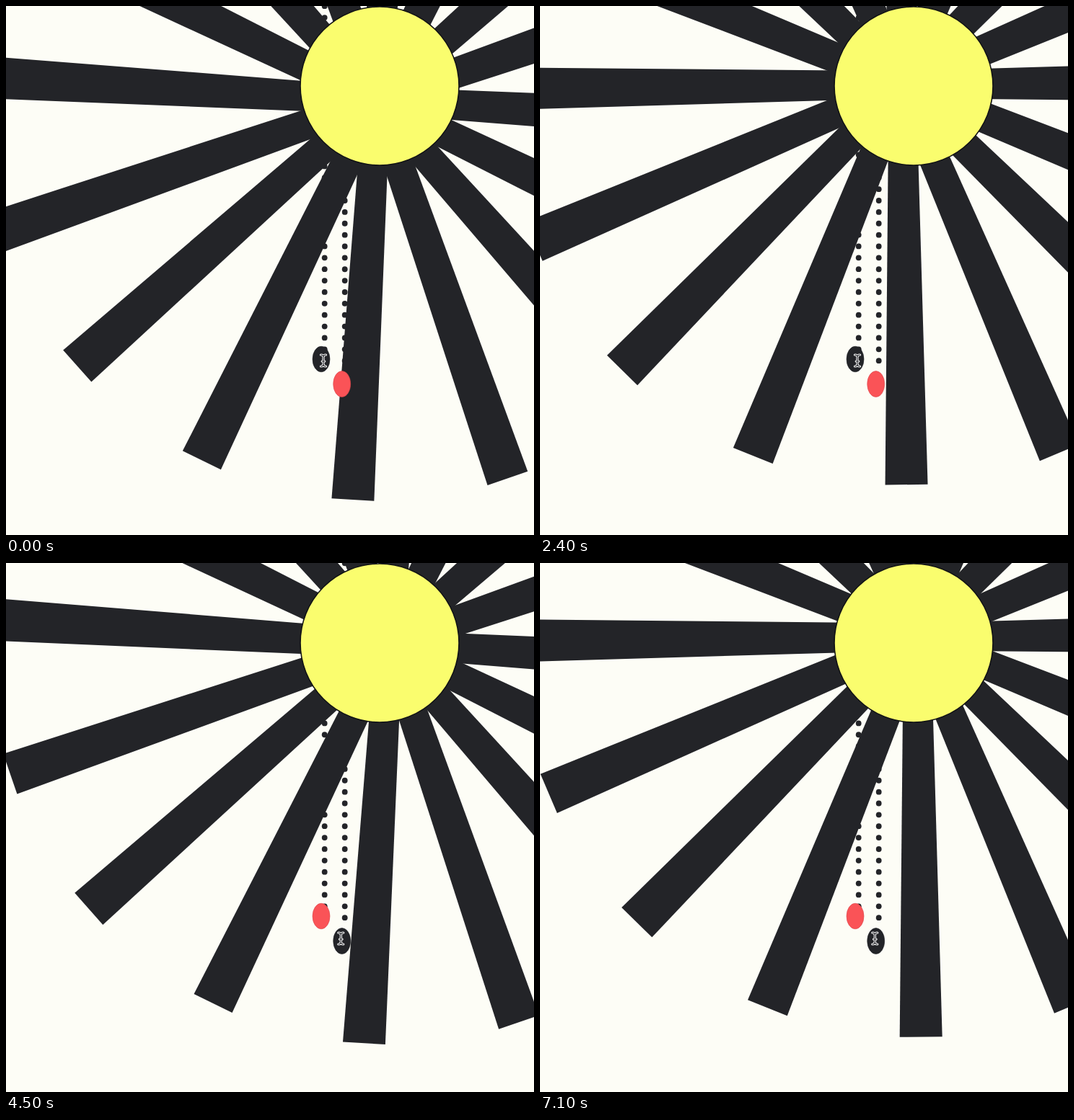
Animation, 732 px wide and 734 px high, one loop 7.2 s. Source, as an HTML page:

```html
<!DOCTYPE html>
<html lang="en">
<head>
<meta charset="utf-8">
<title>Sun fan</title>
<style>
  html, body { margin: 0; width: 100%; height: 100%; overflow: hidden; }
  svg { display: block; width: 100vw; height: 100vh; }
</style>
</head>
<body>
<svg viewBox="0 0 732 734">
  <rect id="wall" width="732" height="734"/>
  <g id="chains" fill="#232428"></g>
  <g id="fan" fill="#232428"></g>
  <circle id="hub" cx="518" cy="111" r="110" stroke="#111214" stroke-width="1.6"/>
  <ellipse id="lampKnob" cx="437" cy="490" rx="12" ry="17.8"/>
  <ellipse id="speedKnob" cx="465.7" cy="524.5" rx="12" ry="18"/>
  <g id="cursor" fill="none" stroke-linecap="round" stroke-linejoin="round">
    <path id="beam" d="M-3.5-8Q0-8 0-5V5Q0 8-3.5 8M3.5-8Q0-8 0-5V5Q0 8 3.5 8M-1.8 1H1.8" stroke="#fff" stroke-width="3.2"/>
    <use href="#beam" id="core"/>
  </g>
</svg>
<script>
const $ = id => document.getElementById(id);
const NS = 'http://www.w3.org/2000/svg';
const LOOP = 7200, STEP = 100;
const INK = '#232428', RED = '#fa5357';

function add(parent, tag, attrs) {
  const el = document.createElementNS(NS, tag);
  for (const k in attrs) el.setAttribute(k, attrs[k]);
  parent.appendChild(el);
  return el;
}

// sixteen blades, slightly wider at the tip
for (let i = 0; i < 16; i++) {
  add($('fan'), 'path', { d: 'M-18.9 0L-29.5 555H29.5L18.9 0Z', transform: `rotate(${i * 22.5})` });
}

function chain(x, bottom) {
  for (let y = bottom; y > -5; y -= 15.87) add($('chains'), 'circle', { cx: x, cy: y, r: 3.9 });
}
chain(441.7, 476.3);
chain(469.7, 492.2);

// dark core of the text cursor
$('core').remove();
add($('cursor'), 'path', { d: $('beam').getAttribute('d'), stroke: INK, 'stroke-width': 1.1 });

// seconds, degrees: slow spin, then fast after the second cord is pulled
const spin = [[0, 3.4], [.5, 26.27], [1.7, 80.4], [3.1, 143.45], [3.9, 179.4], [4.5, 251.04], [5.7, 393], [7.1, 561.95], [7.2, 573.95]];
const moveX = [[0, 440], [3.6, 440], [3.8, 464.3], [7.2, 464.3]];
const moveY = [[0, 492], [3.6, 492], [3.8, 521], [7.2, 521]];
const nights = [[.3, 2.1], [3.2, 3.5]];

function along(keys, t) {
  let i = 1;
  while (i < keys.length - 1 && t > keys[i][0]) i++;
  const [t0, v0] = keys[i - 1], [t1, v1] = keys[i];
  return v0 + (v1 - v0) * (t - t0) / (t1 - t0);
}

function knob(el, hovered) {
  el.setAttribute('fill', hovered ? INK : RED);
  el.setAttribute('stroke', hovered ? INK : '#d8454b');
  el.setAttribute('stroke-width', .6);
}

function draw(t) {
  const dark = nights.some(([a, b]) => t >= a && t < b);
  const x = along(moveX, t), y = along(moveY, t);
  $('wall').setAttribute('fill', dark ? '#5e5e5e' : '#fdfdf6');
  $('hub').setAttribute('fill', dark ? '#9f9f9f' : '#fafd6e');
  // the fan hangs off its axle a little, so it wobbles
  $('fan').setAttribute('transform', `translate(516 116) rotate(${along(spin, t)}) translate(-1.3 15.1)`);
  $('cursor').setAttribute('transform', `translate(${x} ${y})`);
  knob($('lampKnob'), y < 506);
  knob($('speedKnob'), y >= 506);
}

const start = performance.now();
function tick() {
  const ms = (performance.now() - start) % LOOP;
  draw(Math.floor(ms / STEP) * STEP / 1000);
  requestAnimationFrame(tick);
}
tick();
</script>
</body>
</html>
```
